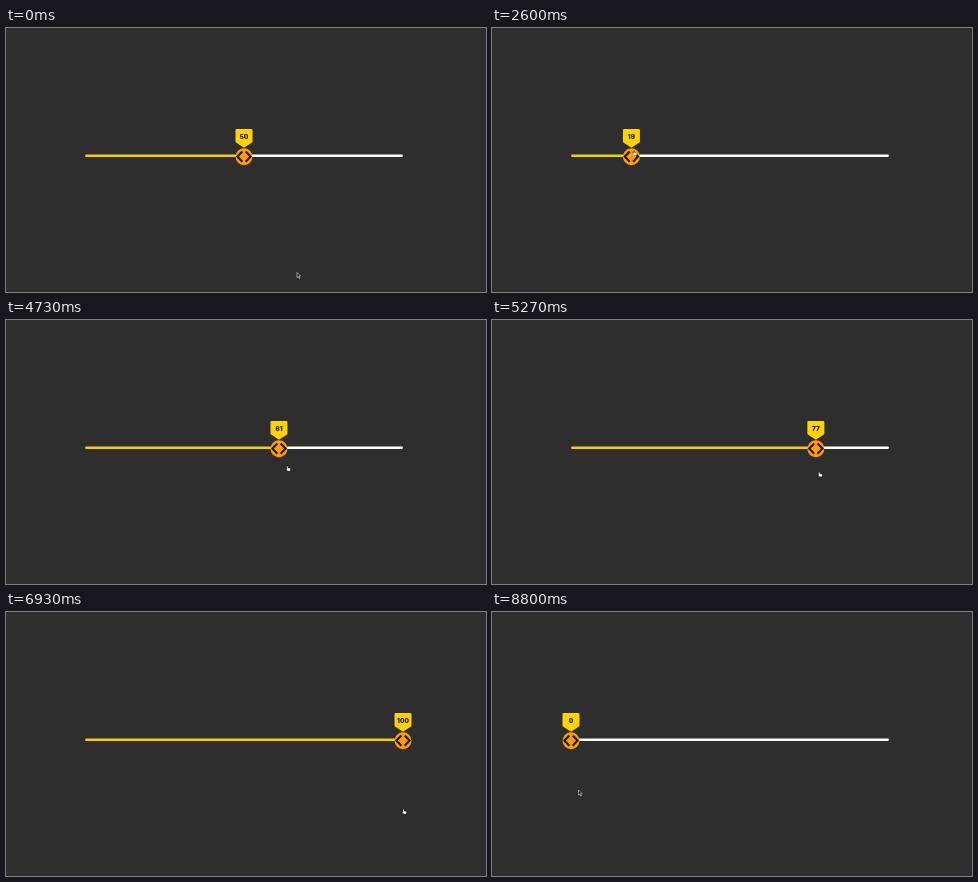
Write an HTML page that moves like this. It is 480 px wide and 264 px high and loops after 9.87 s.

```html
<!DOCTYPE html>
<html lang="en">
<head>
<meta charset="utf-8">
<title>Range slider</title>
<style>
  html, body { margin: 0; width: 100%; height: 100%; overflow: hidden; background: #2e2e2e; }
  svg { display: block; width: 100%; height: 100%; }
  text { font: 800 6.5px Inter, Arial, sans-serif; text-anchor: middle; fill: #17150c; }
  .track { stroke-width: 2.4; stroke-linecap: round; }
</style>
</head>
<body>
<svg viewBox="0 0 480 264">
  <rect width="480" height="264" fill="#2e2e2e"/>
  <path id="rest" class="track" stroke="#fff"/>
  <path id="fill" class="track" stroke="#f8cb12"/>
  <g id="thumb">
    <path d="M-7.2 101H7.2Q8.5 101 8.5 102.3V113.2Q8.5 114.2 7.6 114.7L.7 119.2Q0 119.7-.7 119.2L-7.6 114.7Q-8.5 114.2-8.5 113.2V102.3Q-8.5 101-7.2 101Z" fill="#ffd208"/>
    <text id="label" y="110.9"></text>
    <circle cy="128.8" r="8.5" fill="#ff9b0c"/>
    <path d="M-1.7 123.5L-6.6 128.6L-1.7 133.7M1.7 123.5L6.6 128.6L1.7 133.7" fill="none" stroke="#211a10" stroke-width="2.1"/>
  </g>
  <path id="arrow" d="M0 0V5.1L1.2 4L2.1 6L3 5.6L2.1 3.7H3.7Z" fill="#151515" stroke="#ddd" stroke-width=".6" stroke-linejoin="round"/>
  <path id="hand" d="M-1.6-2.4Q-.9-3-.6-2L-.3-.9L1.5-.6Q2.2-.4 2 .5L1.6 2.2H-.8L-2.1.5Q-2.2-.2-1.3 0Z" fill="#fff" stroke="#222" stroke-width=".3"/>
</svg>
<script>
const LOOP = 9870, STEP = 1000 / 15;
const LEFT = 80.3, RIGHT = 395.7, ZERO = 79, UNIT = 3.18;
const LAG = 6; // the thumb trails the pointer by a few ms

// Pointer strokes: start and end time, end point, sideways swing on the way
const home = { x: 291, y: 244.5 };
const strokes = [
  { from: 0, to: 130, x: 278, y: 211 },
  { from: 270, to: 1270, x: 242.5, y: 132 },
  { from: 1730, to: 2130, x: 156, y: 134 },
  { from: 2200, to: 2870, x: 134, y: 134, dy: -9 },
  { from: 3070, to: 4070, x: 134, y: 134, dx: -22, dy: 15 },
  { from: 4070, to: 4400, x: 129, y: 134, dx: -38 },
  { from: 4530, to: 4750, x: 295, y: 150 },
  { from: 5000, to: 5530, x: 361, y: 159 },
  { from: 5600, to: 5870, x: 355, y: 155, dx: 9, dy: 82 },
  { from: 6070, to: 6470, x: 360, y: 133 },
  { from: 6670, to: 7600, x: 290, y: 136, dx: 75, dy: 85 },
  { from: 7670, to: 8070, x: 29.5, y: 153 },
  { from: 8270, to: 8800, x: 86.5, y: 178 }
];

// Drags: hover and release times, pointer offset from the thumb
const drags = [
  { from: 1330, to: 5730, grip: 4.5 },
  { from: 6400, to: 8270, grip: -2 }
];

const $ = id => document.getElementById(id);
const rest = $("rest"), fill = $("fill"), thumb = $("thumb"), label = $("label");
const arrow = $("arrow"), hand = $("hand");

function pointerAt(t) {
  let pos = home;
  for (const { from, to, x, y, dx = 0, dy = 0 } of strokes) {
    if (t < from) break;
    const f = Math.min(1, (t - from) / (to - from));
    const swing = Math.sin(Math.PI * f);
    pos = {
      x: pos.x + (x - pos.x) * f + dx * swing,
      y: pos.y + (y - pos.y) * f + dy * swing
    };
  }
  return pos;
}

function valueAt(t) {
  const drag = drags.filter(d => t >= d.from).pop();
  if (!drag) return 50;
  const x = pointerAt(Math.min(t, drag.to) - LAG).x - drag.grip;
  return Math.round(Math.max(0, Math.min(100, (x - ZERO) / UNIT)));
}

function draw(ms) {
  const t = Math.floor((ms % LOOP + 7) / STEP) * STEP;
  const value = valueAt(t), x = ZERO + UNIT * value;
  fill.setAttribute("d", `M${LEFT} 127.7H${Math.max(LEFT, x)}`);
  rest.setAttribute("d", `M${Math.min(RIGHT, x + 2)} 127.7H${RIGHT}`);
  thumb.setAttribute("transform", `translate(${x})`);
  label.textContent = value;

  const pos = pointerAt(t);
  const held = drags.some(d => t >= d.from && t < d.to);
  for (const el of [arrow, hand]) {
    el.setAttribute("transform", `translate(${pos.x} ${pos.y})`);
    el.setAttribute("visibility", (el === hand) === held ? "visible" : "hidden");
  }
}

const start = performance.now();
function tick() {
  draw(performance.now() - start);
  requestAnimationFrame(tick);
}
tick();
</script>
</body>
</html>
```
